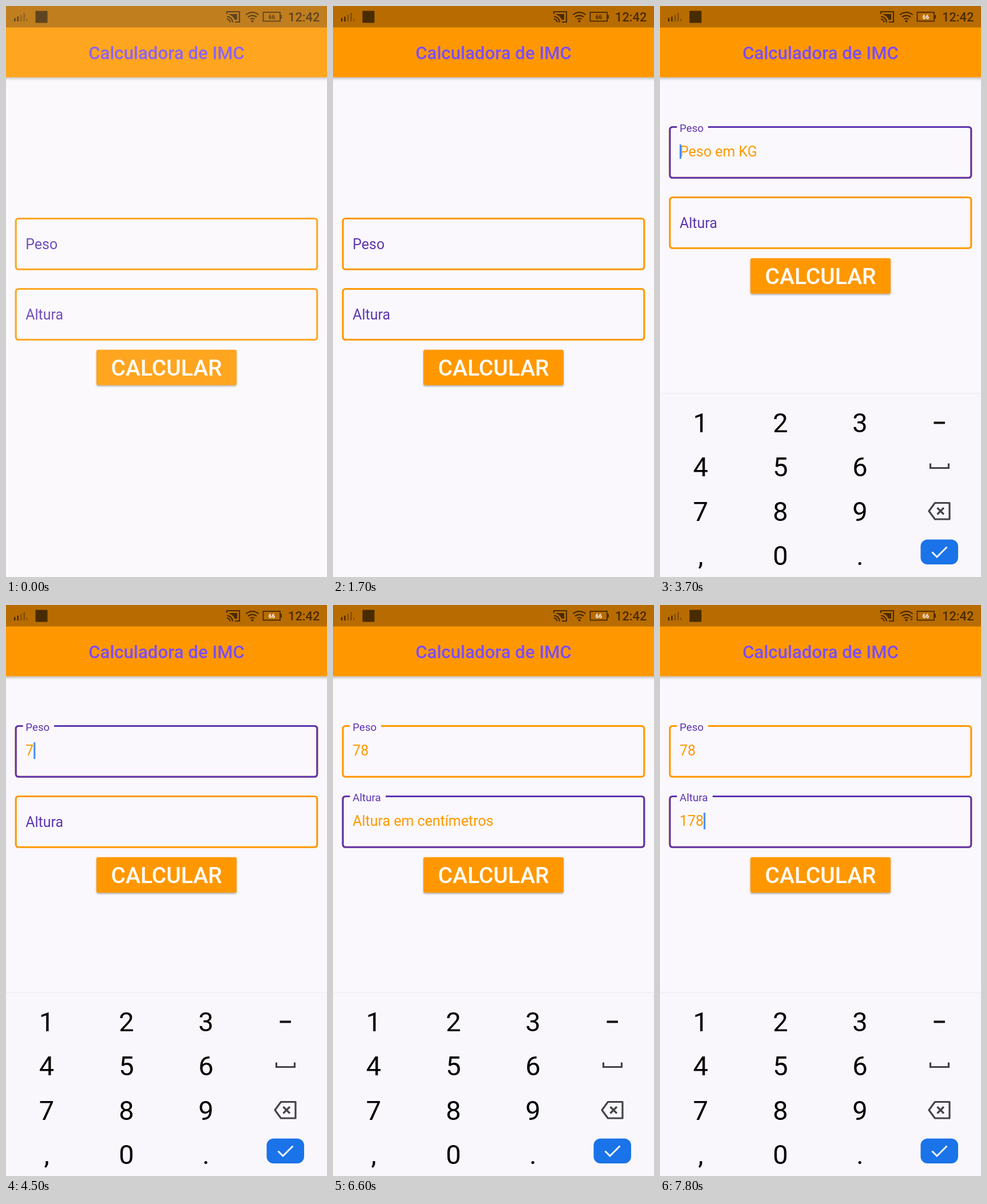
These frames come from a looping animation (561x998 px, 8000 ms). An HTML page:

```html
<!DOCTYPE html>
<html lang="pt">
<head>
<meta charset="utf-8">
<title>Calculadora de IMC</title>
<style>
html, body { margin: 0; width: 100%; height: 100%; overflow: hidden; background: #faf8fc; }
svg { display: block; width: 561px; height: 998px; font-family: Roboto, sans-serif; }
</style>
</head>
<body>
<svg id="stage" viewBox="0 0 561 998">
  <defs>
    <filter id="barShadow" x="-5%" y="-20%" width="110%" height="150%">
      <feDropShadow dx="0" dy="2" stdDeviation="2.5" flood-opacity=".3"/>
    </filter>
    <filter id="buttonShadow" x="-10%" y="-20%" width="120%" height="150%">
      <feDropShadow dx="0" dy="2" stdDeviation="1.5" flood-opacity=".32"/>
    </filter>
  </defs>
  <rect width="561" height="998" fill="#faf8fc"/>
  <rect x="-10" y="0" width="581" height="124.5" fill="#ff9800" filter="url(#barShadow)"/>
  <rect width="561" height="37.5" fill="#b86c00"/>

  <g id="status" fill="#492b00">
    <path d="M14 21h2.5v6H14zM19.5 18.500h2.500v8.500h-2.500z"/>
    <path d="M25 15.500h2.500v11.500H25zM30.500 12h2.500v15h-2.500z" opacity=".45"/>
    <text x="34.500" y="27" font-size="7.500">1</text>
    <rect x="51.500" y="8.500" width="21" height="21" rx="1"/>
    <g fill="none" stroke="#492b00" stroke-width="2.200">
      <path d="M386 14V10H408V28H400M386 18.500A10 10 0 0 1 396 28.500M386 22.800A5.700 5.700 0 0 1 391.700 28.500"/>
      <path d="M419.500 15.500A16 16 0 0 1 441.500 15.500M423 19.500A11 11 0 0 1 438 19.500M426.500 23.300A6 6 0 0 1 434.500 23.300"/>
      <rect x="449.500" y="11" width="29.500" height="15.500" stroke-width="1.800"/>
    </g>
    <path d="M390 14H404V24H399.500A15 15 0 0 0 390 15z"/>
    <circle cx="430.500" cy="26.500" r="2"/>
    <rect x="480" y="15.500" width="2" height="6.500"/>
    <path id="traffic" d="M437 22l2.500-3 2.500 3zM437 24l2.500 3 2.500-3z"/>
    <text id="battery" x="464.500" y="22.800" font-size="10" font-weight="700" text-anchor="middle">66</text>
    <text x="493" y="27" font-size="21.800" font-weight="500">12:42</text>
  </g>
  <text x="280.500" y="93.300" font-size="31.170" font-weight="500" fill="#7c4dff" text-anchor="middle">Calculadora de IMC</text>

  <g id="form">
    <g id="weight"></g>
    <g id="height" transform="translate(0 123)"></g>
    <rect x="158" y="600.800" width="245" height="62" rx="3" fill="#ff9800" filter="url(#buttonShadow)"/>
    <text x="280.500" y="645.800" font-size="38.960" font-weight="500" fill="#fff" text-anchor="middle">CALCULAR</text>
  </g>

  <g id="keyboard">
    <rect y="676.500" width="561" height="2" fill="#000" opacity=".045"/>
    <rect y="678" width="561" height="360" fill="#f9f7fb"/>
    <rect id="press" width="136" height="74" rx="7" fill="#e9e7ec"/>
    <g id="keys">
      <g id="digits" font-size="47" text-anchor="middle"></g>
      <path d="M478.500 728.500H498" stroke="#111" stroke-width="4"/>
      <g fill="none" stroke="#444348" stroke-width="3.200">
        <path d="M472.500 799.500V807.500H504.500V799.500"/>
        <path d="M480.500 868.500H506V897H480.500L470 882.700Z" stroke-linejoin="round"/>
        <path d="M484.500 877L496 888.500M496 877L484.500 888.500"/>
      </g>
      <rect x="455.500" y="932.500" width="65.500" height="43.500" rx="12" fill="#1a73e8"/>
      <path d="M475.500 954.500L484 963L501.500 945.500" fill="none" stroke="#fff" stroke-width="3"/>
    </g>
  </g>
  <rect id="veil" width="561" height="998" fill="#fff"/>
</svg>
<script>
const LOOP = 8000, WEIGHT_FOCUS = 2300, HEIGHT_FOCUS = 6000;
const TEXT_X = 34.3, FONT = 24.93, DIGIT = 14, TOP = 371.5;
const COLS = [71, 210.500, 349.500, 488.500], ROWS = [728, 805.500, 883, 960.500];

// Key presses: character, column, row, touch time, release time
const PRESSES = [
  ['7', 0, 2, 4200, 4400],
  ['8', 1, 2, 4800, 4950],
  ['1', 0, 0, 6900, 7100],
  ['7', 0, 2, 7500, 7600],
  ['8', 1, 2, 7600, 7750]
];

const $ = id => document.getElementById(id);
const set = (el, attrs) => { for (const k in attrs) el.setAttribute(k, attrs[k]); };
const clamp = v => Math.max(0, Math.min(1, v));
const ease = v => v * v * (3 - 2 * v);
const mix = (a, b, p) => a + (b - a) * p;

function outline(gapEnd, p) {
  const l = 17.2, r = 543.8, t = TOP, b = TOP + 88.7, c = 5;
  const gapStart = 29.5;
  const head = p > 0 ? mix(gapStart, gapEnd, p) : gapStart;
  return `M${head} ${t}H${r - c}Q${r} ${t} ${r} ${t + c}V${b - c}Q${r} ${b} ${r - c} ${b}` +
    `H${l + c}Q${l} ${b} ${l} ${b - c}V${t + c}Q${l} ${t} ${l + c} ${t}H${gapStart}`;
}

function makeField(id, label, hint, gapEnd) {
  $(id).innerHTML = `
    <path fill="none" stroke="#ff9800" stroke-width="3.1"/>
    <path fill="none" stroke="#5e35b1" stroke-width="3.1"/>
    <text x="${TEXT_X}" fill="#5e35b1">${label}</text>
    <text x="${TEXT_X}" y="${TOP + 51.5}" font-size="${FONT}" fill="#ff9800"></text>
    <rect width="3" fill="#448aff"/>`;
  const [idle, active, name, value, caret] = $(id).children;
  return (floated, focus, typed, caretOn) => {
    const d = outline(gapEnd, floated);
    set(idle, { d });
    set(active, { d, opacity: focus });
    set(name, { y: TOP + mix(53, 8.2, floated), 'font-size': FONT * mix(1, 0.75, floated) });
    value.textContent = typed || hint;
    set(value, { opacity: floated });
    set(caret, {
      x: TEXT_X + DIGIT * typed.length,
      y: TOP + (typed ? 28.5 : 30.5),
      height: typed ? 29 : 25,
      opacity: +caretOn
    });
  };
}

const drawWeight = makeField('weight', 'Peso', 'Peso em KG', 84);
const drawHeight = makeField('height', 'Altura', 'Altura em centímetros', 92);

$('digits').innerHTML = [...'123456789,0.'].map((ch, i) => {
  const row = Math.floor(i / 3);
  return `<text x="${COLS[i % 3]}" y="${ROWS[row] + 16.8}">${ch}</text>`;
}).join('');

function render(t) {
  const open = t >= WEIGHT_FOCUS;
  const onHeight = t >= HEIGHT_FOCUS;
  const done = PRESSES.filter(p => t >= p[4]);
  const typed = forHeight => done.filter(p => (p[4] > HEIGHT_FOCUS) === forHeight).map(p => p[0]).join('');

  // The caret restarts its blink on focus and on each typed digit
  const blinkStart = Math.max(2250, onHeight ? HEIGHT_FOCUS : 0, ...done.map(p => p[4]));
  const caretOn = open && (t - blinkStart) % 1000 < 500;
  const shift = ease(clamp((t - HEIGHT_FOCUS) / 200));

  drawWeight(+open, open ? 1 - shift : 0, typed(false), caretOn && !onHeight);
  drawHeight(shift, shift, typed(true), caretOn && onHeight);
  set($('form'), { transform: `translate(0 ${open ? -160 : 0})` });

  const shown = t >= 2400;
  set($('keyboard'), {
    transform: `translate(0 ${shown ? 0 : 34})`,
    visibility: open ? 'visible' : 'hidden'
  });
  set($('keys'), { opacity: shown ? 1 : 0.74 });
  const held = PRESSES.find(p => t >= p[3] && t < p[4]);
  set($('press'), { opacity: held ? 1 : 0 });
  if (held) set($('press'), { x: COLS[held[1]] - 68, y: ROWS[held[2]] - 37 });

  set($('battery'), { fill: t >= 3000 ? '#fff' : '#492b00' });
  set($('traffic'), { opacity: t >= 7500 ? 1 : 0 });
  set($('veil'), { opacity: t < 100 ? 0.12 : 0 });
}

const start = performance.now();
function tick() {
  render((performance.now() - start) % LOOP);
  requestAnimationFrame(tick);
}
tick();
</script>
</body>
</html>
```
